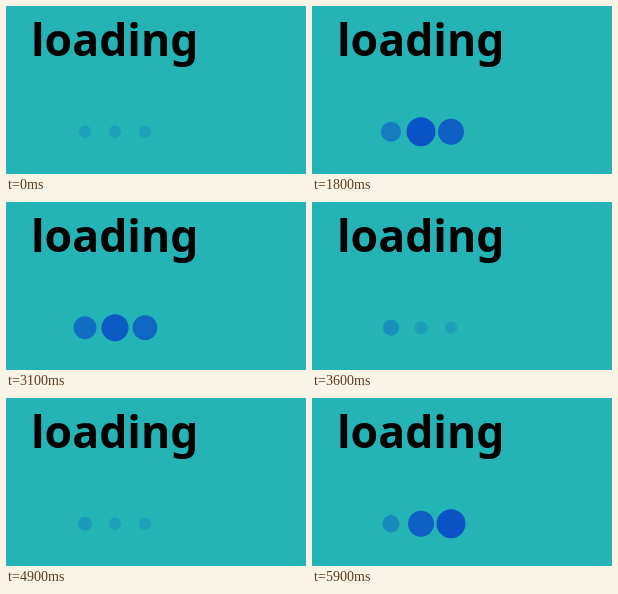
Animation of 300 by 168 pixels, one loop 6 s. Source, as an HTML page with a canvas:

```html
<!DOCTYPE html>
<html lang="en">
<head>
<meta charset="utf-8">
<title>Loading</title>
<style>
  html, body { margin: 0; width: 100%; height: 100%; overflow: hidden; background: #24b4b6; }
  canvas { display: block; }
</style>
</head>
<body>
<canvas id="stage" width="300" height="168"></canvas>
<script>
const ctx = document.getElementById("stage").getContext("2d");

const LOOP = 6000, STEP = 100, PERIOD = 670, START_DELAY = 100;
const REST = 6.2, PEAK = 14.5;

// Each pulse: [phase, radius] stops over one period.
const dots = [
  { x: 79, stops: [[0, 7.3], [0.313, 7], [0.373, 8], [0.53, PEAK], [0.687, 10], [0.731, 9.8], [0.806, 8.6], [1, 7.3]] },
  { x: 109, stops: [[0, 7.5], [0.15, REST], [0.313, REST], [0.373, 6.5], [0.7, PEAK], [0.806, 13], [1, 7.5]] },
  { x: 139, stops: [[0, 8.5], [0.18, REST], [0.373, REST], [0.69, 13], [0.806, PEAK], [1, 8.5]] }
];

function radiusAt(stops, phase) {
  const i = stops.findIndex(([p]) => p > phase);
  const [p0, r0] = stops[i - 1], [p1, r1] = stops[i];
  const ease = (1 - Math.cos(Math.PI * (phase - p0) / (p1 - p0))) / 2;
  return r0 + (r1 - r0) * ease;
}

function drawDot(x, radius) {
  const alpha = 0.2 + 0.8 * (radius - REST) / (PEAK - REST);
  ctx.fillStyle = `rgba(10, 82, 198, ${alpha})`;
  ctx.beginPath();
  ctx.arc(x, 125.7, radius, 0, 2 * Math.PI);
  ctx.fill();
}

function draw(now) {
  const time = Math.floor(now % LOOP / STEP) * STEP;
  const phase = time % PERIOD / PERIOD;

  ctx.fillStyle = "#24b4b6";
  ctx.fillRect(0, 0, 300, 168);
  ctx.fillStyle = "#000";
  ctx.font = "bold 44.6px 'Noto Sans', sans-serif";
  ctx.fillText("loading", 25, 50);

  for (const { x, stops } of dots) {
    drawDot(x, time < START_DELAY ? REST : radiusAt(stops, phase));
  }
}

const start = performance.now();
function tick() {
  draw(performance.now() - start);
  requestAnimationFrame(tick);
}
tick();
</script>
</body>
</html>
```
